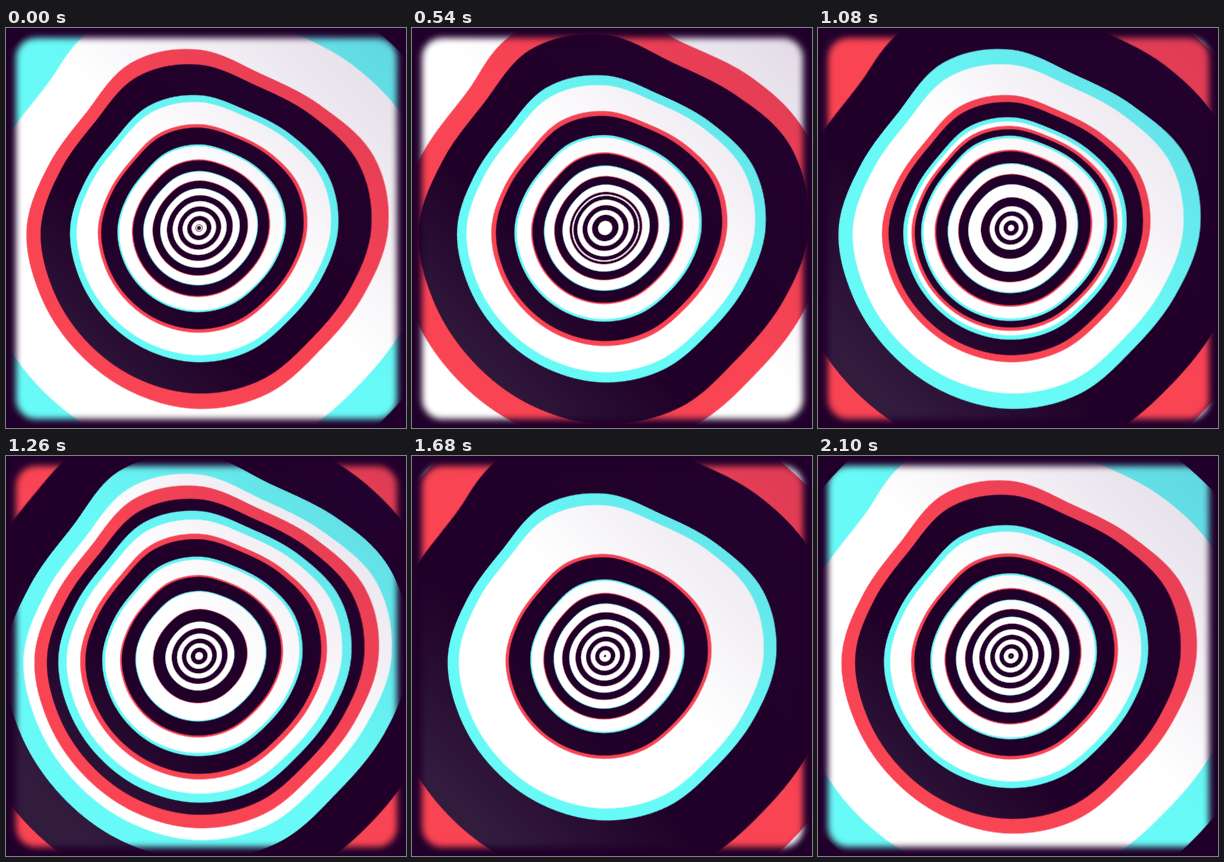
These frames come from a looping animation (400x400 px, 2160 ms). An HTML page with a canvas:

```html
<!DOCTYPE html>
<html lang="en">
<head>
<meta charset="utf-8">
<title>Ring tunnel</title>
<style>
html, body { margin: 0; width: 100%; height: 100%; overflow: hidden; background: #20002a; }
canvas { display: block; width: 100vmin; height: 100vmin; }
</style>
</head>
<body>
<canvas id="stage" width="400" height="400"></canvas>
<script>
const SIZE = 400, LOOP = 2160, STEP = 60;
const CX = 193, CY = 200;
const SUB = 8, MAX_R = 420;           // samples per pixel of radius
const PERIOD = 0.0029, SPEED = 1.65e-5;
const DARK = [32, 0, 40], RED = [249, 68, 84], CYAN = [104, 250, 247], WHITE = [255, 255, 255];

const ctx = document.getElementById('stage').getContext('2d');
const image = ctx.createImageData(SIZE, SIZE);
const clamp = v => Math.min(1, Math.max(0, v));
const smooth = v => v * v * (3 - 2 * v);
const depth = r => 1 / (r + 24 + 14 * Math.exp(-r / 25) - 0.15 * Math.max(0, r - 180));
const Z0 = depth(174);

// Radial bumps of the wide rings, evenly spaced clockwise from the right
const BUMPS = [0.08, 0.02, -0.012, 0.03, 0.038, 0.018, -0.003, -0.01,
  -0.01, -0.066, -0.078, 0.025, 0.024, -0.05, -0.008, 0.078];

function bumpAt(a) {
  const n = BUMPS.length, u = (a / (2 * Math.PI) + 1) * n, i = Math.floor(u), f = u - i;
  const [p, q, r, s] = [-1, 0, 1, 2].map(k => BUMPS[(i + k) % n]);
  return q + f / 2 * (r - p + f * (2 * p - 5 * q + 4 * r - s + f * (3 * (q - r) + s - p)));
}

// Wide rings are bumpy, small ones are tilted ovals, the outermost turn round
function bend(r, a) {
  const s = Math.min(r / 174, 1.1);
  const oval = 0.02 + 0.02 * Math.cos(a) - 0.03 * Math.sin(2 * a);
  const calm = 1 - 0.7 * smooth(clamp((r - 190) / 60));
  return s * calm * bumpAt(a) + Math.max(0, 1 - s) * oval;
}

const radius = new Uint16Array(SIZE * SIZE);
for (let y = 0, i = 0; y < SIZE; y++) {
  for (let x = 0; x < SIZE; x++, i++) {
    const dx = x + 0.5 - CX, dy = y + 0.5 - CY, r = Math.hypot(dx, dy);
    radius[i] = Math.round(r / (1 + bend(r, Math.atan2(dy, dx))) * SUB);
  }
}

// A surge that runs outwards through the tunnel, its front widening on the way
function surge(z, t) {
  const front = 0.0044 - SPEED * (t - 1260);
  const width = 0.0034 * 0.0044 / Math.max(0.0044, front);
  const rise = clamp((z - front) / width);
  const fall = clamp((z - front - 0.0056) / 0.0072);
  return 0.92 * z / (z + 0.001) * rise * (2 - rise) * (1 - smooth(fall));
}

function isLight(r, t) {
  const z = depth(r);
  const p = (z - Z0) / PERIOD + t / LOOP + surge(z, t) + surge(z, t - LOOP);
  return p - Math.floor(p) >= 0.5 ? 1 : 0;
}

const count = MAX_R * SUB;
const raw = new Float32Array(count), blue = new Float32Array(count), red = new Float32Array(count);

function blur(out) {
  const half = SUB / 2 + 1;
  for (let i = 0; i < count; i++) {
    let sum = 0;
    for (let k = -half; k <= half; k++) sum += raw[Math.min(count - 1, Math.abs(i + k))];
    out[i] = sum / (2 * half + 1);
  }
}

function fillRings(t) {
  for (let i = 0; i < count; i++) raw[i] = isLight(i / SUB, t);
  blur(blue);
  for (let i = 0; i < count; i++) {
    const r = i / SUB;
    raw[i] = isLight(r + 12.5 * (r / 152) ** 3, t);
  }
  blur(red);
  const px = image.data;
  for (let i = 0, j = 0; i < radius.length; i++, j += 4) {
    const a = red[radius[i]], b = blue[radius[i]];
    for (let c = 0; c < 3; c++) {
      px[j + c] = (1 - a) * ((1 - b) * DARK[c] + b * CYAN[c]) + a * ((1 - b) * RED[c] + b * WHITE[c]);
    }
    px[j + 3] = 255;
  }
  ctx.putImageData(image, 0, 0);
}

function fade(x0, y0, x1, y1, color) {
  const g = ctx.createLinearGradient(x0, y0, x1, y1);
  g.addColorStop(0, `rgba(${color},1)`);
  g.addColorStop(1, `rgba(${color},0)`);
  ctx.fillStyle = g;
  ctx.fillRect(0, 0, SIZE, SIZE);
}

function drawLight() {
  ctx.globalAlpha = 0.14;
  fade(380, 20, 210, 190, '60,10,90');
  ctx.globalAlpha = 1;
  ctx.globalCompositeOperation = 'lighten';
  fade(50, 350, 150, 250, '50,28,62');
  ctx.globalCompositeOperation = 'source-over';
}

function drawFrame() {
  ctx.save();
  ctx.filter = 'blur(3px)';
  ctx.fillStyle = '#20002a';
  ctx.beginPath();
  ctx.rect(-40, -40, SIZE + 80, SIZE + 80);
  ctx.roundRect(10, 10, 381, 381, 20);
  ctx.fill('evenodd');
  ctx.restore();
}

let shown = -1;
function tick() {
  const t = Math.floor(performance.now() % LOOP / STEP) * STEP;
  if (t !== shown) {
    shown = t;
    fillRings(t);
    drawLight();
    drawFrame();
  }
  requestAnimationFrame(tick);
}
tick();
</script>
</body>
</html>
```
